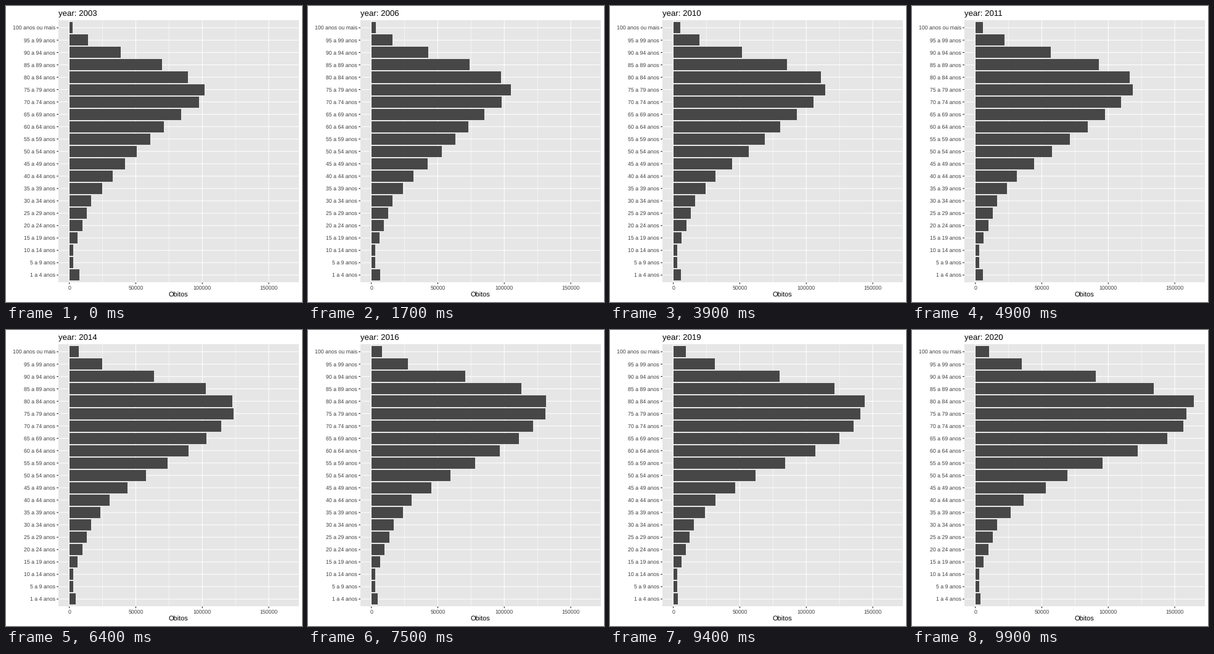
These frames come from a looping animation (480 by 480 pixels, 10000 ms). A matplotlib script:

```python
import matplotlib.pyplot as plt
import numpy as np
from matplotlib.animation import FuncAnimation
from matplotlib.patches import Rectangle

SIZE, DPI, FRAMES = 480, 72, 100
FIRST, LAST = 2003, 2020
LEFT, RIGHT, TOP, BOTTOM = 85, 474.5, 23.25, 448.3
ZERO, STEP = 102.7, 107.8          # x of 0, pixels per 50000 deaths
ROW0, ROW = 35.29, 20.05           # first row centre, row spacing
PANEL, BAR, LABEL, TICK = "#e6e6e6", "#474747", "#404040", "#262626"

plt.rcParams["font.family"] = "Liberation Sans"
plt.rcParams["text.hinting"] = "no_hinting"

ages = ["100 anos ou mais"]
ages += [f"{a} a {a + 4} anos" for a in range(95, 0, -5)] + ["1 a 4 anos"]
rows = np.arange(len(ages))

# Bar tips (x in pixels) at a few older rows; the rest is interpolated
key_rows = [0, 1, 2, 3, 4, 5, 6, 7, 8, 10, 12]
key_tips = {
    2003: [108, 133, 186, 253, 295, 322, 313, 284, 256, 212, 173],
    2008: [112, 141, 204, 272, 331, 340, 321, 293, 267, 224, 172],
    2018: [122, 166, 264, 358, 391, 388, 368, 347, 316, 229, 165],
    2020: [125, 178, 298, 392, 457, 445, 440, 414, 366, 252, 181],
}
# Good and bad years around the trend
swing = {2003: 1, 2004: 1.006, 2005: 0.975, 2008: 1, 2011: 1.008, 2014: 1,
         2016: 1.03, 2018: 1, 2019: 0.94, 2020: 1}


def profile(year):
    """Bar lengths of all age groups in a whole year."""
    old = [np.interp(year, list(key_tips), tip)
           for tip in zip(*key_tips.values())]
    young = np.maximum(109, 138 - 7.2 * (rows - 14))   # hardly changes
    young[-1] = 118.5 - 8 * (year - FIRST) / (LAST - FIRST)
    tips = np.where(rows < 14, np.interp(rows, key_rows + [14], old + [138]),
                    young)
    return (tips - ZERO) * np.interp(year, list(swing), list(swing.values()))


years = np.arange(FIRST, LAST + 1)
keys = np.round((FRAMES - 1) * (years - FIRST) / (LAST - FIRST))
lengths = np.array([profile(y) for y in years])

fig = plt.figure(figsize=(SIZE / DPI, SIZE / DPI), dpi=DPI, facecolor="white")
ax = fig.add_axes([0, 0, 1, 1])
ax.set(xlim=(0, SIZE), ylim=(SIZE, 0))
ax.axis("off")


def line(xs, ys, color="white", width=1.07, z=2):
    ax.plot(xs, ys, color=color, lw=width, zorder=z, snap=False,
            solid_capstyle="butt")


def text(x, y, s, size, color, ha):
    return ax.text(x, y, s, size=size, color=color, ha=ha, va="baseline")


def box(x, y, w, h, color, z):
    return ax.add_patch(Rectangle((x, y), w, h, fc=color, lw=0, zorder=z,
                                  antialiased=False))


box(LEFT, TOP, RIGHT - LEFT, BOTTOM - TOP, PANEL, 0)

for k in range(3):
    x = ZERO + (k + 0.5) * STEP
    line([x, x], [TOP, BOTTOM], width=0.53, z=1)
for k in range(4):
    x = ZERO + k * STEP
    line([x, x], [TOP, BOTTOM])
    line([x, x], [BOTTOM, BOTTOM + 2.75], TICK)
    text(x, 459.7, str(50000 * k), 8.8, LABEL, "center")

bars = []
for i, age in enumerate(ages):
    y = ROW0 + i * ROW
    line([LEFT, RIGHT], [y, y])
    line([LEFT - 2.75, LEFT], [y, y], TICK)
    text(80, y + 3.1, age, 8.8, LABEL, "right")
    bars.append(box(ZERO, y - 0.45 * ROW, 0, 0.9 * ROW, BAR, 3))

text((LEFT + RIGHT) / 2, 472.1, "Obitos", 11, "black", "center")
title = text(LEFT, 15, "", 13.2, "black", "left")


def update(i):
    year = round(FIRST + (LAST - FIRST) * i / (FRAMES - 1))
    title.set_text(f"year: {year}")
    for bar, path in zip(bars, lengths.T):
        bar.set_width(np.interp(i, keys, path))
    return [title, *bars]


anim = FuncAnimation(fig, update, frames=FRAMES, interval=100,
                     repeat=True, repeat_delay=0)
plt.show()
```
